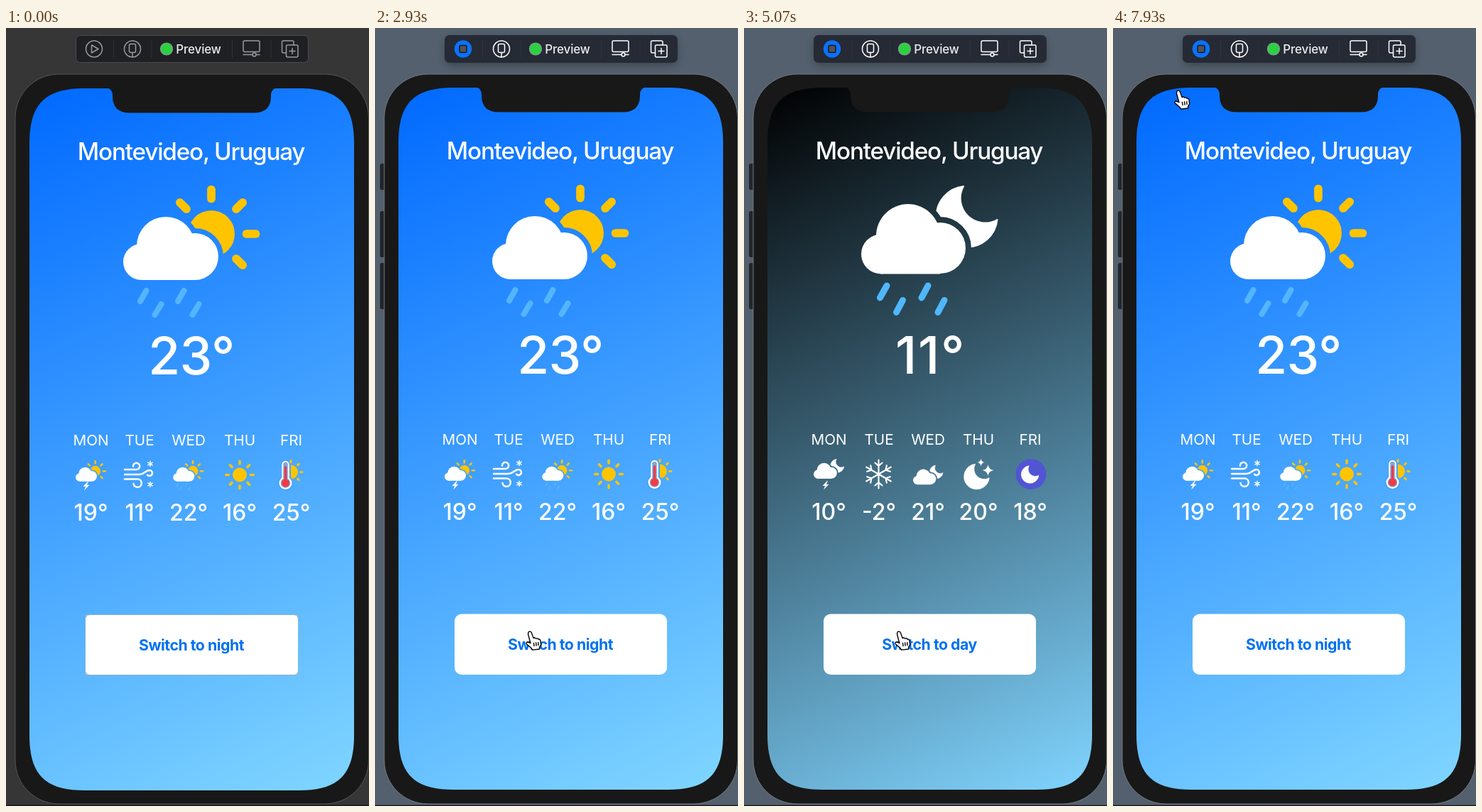
An HTML page for the animation above (8 s loop, 511 by 1096 pixels).

```html
<!DOCTYPE html>
<html lang="en">
<head>
<meta charset="utf-8">
<style>
  html, body { margin: 0; width: 511px; height: 1096px; overflow: hidden; background: #363636; }
  svg { display: block; }
  text { font-family: Inter, Roboto, sans-serif; font-optical-sizing: none; fill: #fff; text-anchor: middle; }
  .city { font-size: 33.3px; font-weight: 500; letter-spacing: -1.22px; }
  .now { font-size: 73px; font-weight: 500; letter-spacing: -.5px; }
  #night .now { letter-spacing: 1.6px; }
  .day { font-size: 20.7px; }
  .temp { font-size: 32px; font-weight: 500; }
  .label { font-size: 21.3px; font-weight: 700; letter-spacing: -.5px; fill: #0071f0; }
  .line { fill: none; stroke-linecap: round; stroke-linejoin: round; }
</style>
</head>
<body>
<svg width="511" height="1096" viewBox="0 0 511 1096">
  <defs>
    <linearGradient id="dayFill" gradientUnits="userSpaceOnUse" x1="33" y1="84" x2="490" y2="1073">
      <stop stop-color="#0069ff"/><stop offset="1" stop-color="#80d6ff"/>
    </linearGradient>
    <linearGradient id="nightFill" gradientUnits="userSpaceOnUse" x1="33" y1="84" x2="490" y2="1073">
      <stop stop-color="#000"/><stop offset="1" stop-color="#80d4ff"/>
    </linearGradient>
    <filter id="soft" x="-10%" y="-50%" width="120%" height="200%"><feGaussianBlur stdDeviation="6"/></filter>

    <g id="dayCloud">
      <circle cx="190.5" cy="328.5" r="25.5"/><circle cx="225" cy="306" r="41"/>
      <circle cx="266" cy="321" r="33"/><path d="M190 312H266V354H190z"/>
    </g>
    <g id="nightCloud">
      <circle cx="193" cy="318.5" r="28"/><circle cx="231" cy="293" r="45"/>
      <circle cx="276" cy="310" r="36"/><path d="M193 300H276V346.5H193z"/>
    </g>
    <mask id="dayGap" maskUnits="userSpaceOnUse" x="150" y="200" width="230" height="230">
      <path d="M150 200H380V430H150z" fill="#fff"/><use href="#dayCloud" stroke="#000" stroke-width="14"/>
    </mask>
    <mask id="nightGap" maskUnits="userSpaceOnUse" x="150" y="200" width="230" height="230">
      <path d="M150 200H380V430H150z" fill="#fff"/><use href="#nightCloud" stroke="#000" stroke-width="16"/>
    </mask>
    <path id="moon" d="M309 223A43 43 0 1 0 356.500 270A34.700 34.700 0 0 1 309 223z" fill="#fff" stroke="#fff" stroke-width="2" stroke-linejoin="round"/>
    <g id="cloudSun">
      <g mask="url(#dayGap)"><circle cx="289" cy="289" r="33" fill="#ffc400"/><g id="bigRays"></g></g>
      <use href="#dayCloud" fill="#fff"/>
    </g>
    <g id="cloudMoon">
      <g mask="url(#nightGap)"><use href="#moon"/></g>
      <use href="#nightCloud" fill="#fff"/>
    </g>
    <path id="dayRain" class="line" stroke="#55b5fb" stroke-width="8"
      d="M197.500 369l-8.500 15M218.500 388l-9 15M250.500 369l-8.500 15M271.500 388l-9 15"/>
    <path id="nightRain" class="line" stroke="#50b7fd" stroke-width="9"
      d="M201 363l-9.500 17M223.500 383.500l-9 17M259 363l-9 17M282 383.500l-9 17"/>
    <path id="bolt" d="M2-6L-4.500 1H-.8L-3 6.500 4.500-1.200H.8L3-6z" fill="#fff"/>
    <path id="spark" d="M0-8Q1-1 8 0Q1 1 0 8Q-1 1-8 0Q-1-1 0-8z" fill="#fff"/>
  </defs>

  <rect id="back" width="511" height="1096"/>
  <path d="M0 1095.500H511" stroke="#15101a" stroke-width="1.500"/>

  <g id="sideKeys" fill="#22262b">
    <rect x="7" y="191" width="10" height="37" rx="2.500"/>
    <rect x="7" y="258" width="10" height="65" rx="2.500"/>
    <rect x="7" y="331" width="10" height="65" rx="2.500"/>
    <rect x="508" y="258" width="6" height="107" fill="#0c0c0c"/>
  </g>
  <path id="body" fill="#181818"/>
  <path id="off" d="M33 84H490V1073H33z"/>

  <g id="app">
    <path id="screen"/>
    <path fill="#181818" d="M141 83.500Q150 84 150 94V95Q150 118.500 174 118.500H349Q373 118.500 373 95V94Q373 84 382 83.500z"/>
    <text class="city" x="260.600" y="184.500">Montevideo, Uruguay</text>
    <g id="day"></g>
    <g id="night"></g>
    <rect id="pick" x="112" y="825.500" width="299" height="85" fill="#a9c3d2" stroke="#86b4d4"/>
    <g id="button">
      <rect id="plate" x="112" width="299" fill="#fff"/>
      <text id="label" class="label" x="261" y="876"></text>
    </g>
  </g>

  <rect id="glow" x="99" y="14" width="326" height="38" rx="7" opacity=".3" filter="url(#soft)"/>
  <rect id="bar" x="98.500" y="10.500" width="327" height="38" rx="6"/>
  <path id="splits" d="M151.500 16V42M205 16V42M318.500 16V42M373 16V42"/>
  <g id="play" class="line" stroke="#9a9a9e" stroke-width="1.500">
    <circle cx="124" cy="29.500" r="11.500"/><path d="M120.500 24V35L130 29.500z"/>
  </g>
  <g id="stop">
    <circle cx="124" cy="29.500" r="12.200" fill="#0a72ff"/>
    <rect x="119" y="24.500" width="10" height="10" rx="1.500" fill="#505357" stroke="#131a26" stroke-width="1.500"/>
  </g>
  <g id="pin" class="line" stroke-width="1.500">
    <circle cx="178" cy="29.500" r="11.500"/><rect x="173.500" y="22.500" width="9" height="12" rx="2"/><path d="M178 34.500V41"/>
  </g>
  <circle cx="226" cy="29.500" r="8.500" fill="#2bd140" stroke="#8d9c90" stroke-width="1.200"/>
  <text x="271" y="35.500" style="font-size:17px;font-weight:500;letter-spacing:-.2px;fill:#ececee">Preview</text>
  <g id="tools" class="line" stroke-width="1.500">
    <rect x="334" y="18" width="23" height="15.500" rx="2"/>
    <path d="M334 37.500H347M352 37.500H357"/><circle cx="349.500" cy="37.500" r="2.500"/>
    <path d="M394 35H390.500Q388.500 35 388.500 33V20Q388.500 18 390.500 18H403Q405 18 405 20V24"/>
    <rect x="394.500" y="24" width="16.500" height="17" rx="2"/><path d="M399 32.500H407M403 28.500V36.500"/>
  </g>

  <path id="arrow" d="M0 0V20.500L4.800 16 8 24 11.800 22.400 8.500 14.800H15z" fill="#fff" stroke="#000" stroke-width="1.700"/>
  <g id="hand" stroke="#000" stroke-width="1.300" stroke-linejoin="round">
    <path fill="#fff" d="M-1-.8C.5-2.600 2.500-1.800 3.200 0L5.800 7.200C7 6.200 8.600 6.600 9.100 7.800 10.300 7 11.700 7.500 12.200 8.700 13.400 8.200 14.800 8.900 15 10.300L15.800 15.700 13.800 19.200V21.700L4.300 22.700 2.800 20.200-2.700 15.700C-4.700 13.900-3.700 11.900-1.400 12.300L1.800 13.900-1.400 1.900z"/>
    <path fill="none" d="M6 13l.8 5M9 12.600l.6 5M12 12.400l.3 4.600"/>
  </g>
</svg>

<script>
const $ = id => document.getElementById(id);
const show = (id, on) => $(id).style.display = on ? '' : 'none';
const paint = (id, attrs) => { for (const k in attrs) $(id).setAttribute(k, attrs[k]); };

// Rectangle whose corners start e away from the edges and bulge by k
function smoothRect(x, y, w, h, e, k) {
  const c = e * (1 - k), r = x + w, b = y + h;
  return `M${x + e} ${y}H${r - e}C${r - c} ${y} ${r} ${y + c} ${r} ${y + e}V${b - e}` +
    `C${r} ${b - c} ${r - c} ${b} ${r - e} ${b}H${x + e}C${x + c} ${b} ${x} ${b - c} ${x} ${b - e}V${y + e}` +
    `C${x} ${y + c} ${x + c} ${y} ${x + e} ${y}z`;
}

const line = (d, width, color = '#fff') => `<path class="line" d="${d}" stroke="${color}" stroke-width="${width}"/>`;
const spokes = (x, y, d, width, angles, color) =>
  angles.map(a => `<g transform="translate(${x} ${y}) rotate(${a})">${line(d, width, color)}</g>`).join('');
const turns = n => Array.from({ length: n }, (_, i) => i * 360 / n);
const use = (id, x = 0, y = 0, s = 1) => `<use href="#${id}" transform="translate(${x} ${y}) scale(${s})"/>`;
const text = (cls, x, y, s) => `<text class="${cls}" x="${x}" y="${y}">${s}</text>`;

const gold = '#ffc400';
const wind = line('M167 621H183.500a4.600 4.600 0 1 0-4.500-4.500M167 628H188c7 0 8-6 14-6a4 4 0 1 1-3 6.700' +
  'M167 634.500H185a5.700 5.700 0 1 1-5.500 6.500', 2.5) +
  [613, 642].map(y => spokes(203, y, 'M0-3.600V3.600', 1.5, [0, 60, 120])).join('');
const sun = `<circle cx="329" cy="628.500" r="10" fill="${gold}"/>` +
  spokes(329, 628.5, 'M0-15.500V-19.300', 3.5, turns(8), gold);
const heat = `<path d="M401 614.500a10 10 0 0 1 0 20z" fill="${gold}"/>` +
  spokes(401, 624.5, 'M0-13.700V-16', 3, [0, 45, 90, 135], gold) +
  [['#4ea3f5', 13.5, 11], ['#fff', 10.5, 9], ['#7aa6e0', 6.5, 6.8]].map(([color, width, r]) =>
    line('M393.500 614V640', width, color) + `<circle cx="393.500" cy="640" r="${r}" fill="${color}"/>`).join('') +
  line('M393.500 618V640', 3.6, '#f23b45') + '<circle cx="393.500" cy="640" r="5.500" fill="#f23b45"/>';
const flake = spokes(189.5, 628.5, 'M0 0V-20M-5-16L0-11.500 5-16', 2.1, turns(6));
const stars = use('moon', 197.6, 522, .414) + use('spark', 343.5, 623) + use('spark', 333.5, 612, .65);
const badge = '<circle cx="404" cy="628.500" r="21.500" fill="#5155d3"/>' + use('moon', 312.6, 552.7, .287);

const names = ['MON', 'TUE', 'WED', 'THU', 'FRI'];
const forecast = (xs, temps) => xs.map((x, i) =>
  text('day', x, 587, names[i]) + text('temp', x, 692.5, temps[i] + '°')).join('');

$('bigRays').innerHTML = spokes(289, 289, 'M0-49.500V-62.500', 11.7, [-45, 0, 45, 90, 135], gold);
$('day').innerHTML = use('cloudSun') + use('dayRain') + text('now', 261, 487, '23°') +
  forecast([119.5, 188, 257, 329, 401.5], [19, 11, 22, 16, 25]) +
  use('cloudSun', 61, 558.5, .224) + use('bolt', 113, 644) + wind +
  use('cloudSun', 198.3, 558.5, .224) + use('dayRain', 198.3, 558.5, .224) + sun + heat;
$('night').innerHTML = use('cloudMoon') + use('nightRain') + text('now', 262.5, 487, '11°') +
  forecast([119.5, 190, 259, 330, 403], [10, -2, 21, 20, 18]) +
  use('cloudMoon', 61, 557.3, .224) + use('bolt', 115, 644) + flake +
  use('cloudMoon', 201.7, 567, .22) + stars + badge;
paint('body', { d: smoothRect(13, 65, 497.5, 1028, 62, .56) });
paint('screen', { d: smoothRect(33, 84, 457, 989, 78, .72) });

const LOOP = 8000, RUN = 1800, LAUNCH = 2870, HOLD = 270, FADE = 350;
const presses = [3870, 6530];
// start, end, from x, y, to x, y
const moves = [
  [1370, 1640, 112, -26, 121, 24],
  [2150, 2840, 130, 24, 217, 852],
  [7400, 7930, 217, 852, 91, 90]
];

function pointer(t) {
  let at = [112, -40];
  for (const [start, end, x0, y0, x1, y1] of moves) {
    if (t < start) break;
    const u = Math.min(1, (t - start) / (end - start)), e = u * u * (3 - 2 * u);
    at = [x0 + (x1 - x0) * e, y0 + (y1 - y0) * e];
  }
  return at;
}

function buttonAlpha(t) {
  const press = presses.find(p => t >= p && t < p + HOLD + FADE);
  if (press === undefined) return 1;
  return .2 + .8 * Math.max(0, (t - press - HOLD) / FADE);
}

function draw(t) {
  const running = t >= RUN, live = t >= LAUNCH;
  const night = t >= presses[0] + HOLD && t < presses[1] + HOLD;

  paint('back', { fill: running ? '#54606e' : '#363636' });
  paint('body', { stroke: running ? '#747b83' : '#555' });
  paint('bar', { fill: running ? '#252a35' : '#1f2024', stroke: running ? '#272c37' : '#4b4b4f' });
  paint('splits', { stroke: running ? '#2d3442' : '#303136' });
  paint('pin', { stroke: running ? '#fff' : '#9a9a9e' });
  paint('tools', { stroke: live ? '#fff' : running ? '#6b7079' : '#9a9a9e' });
  for (const id of ['sideKeys', 'glow', 'stop']) show(id, running);
  show('play', !running);
  show('pick', !running);
  show('off', running && !live);
  show('app', !running || live);

  paint('app', { transform: `translate(0 ${running ? 0 : 1})` });
  paint('screen', { fill: `url(#${night ? 'nightFill' : 'dayFill'})` });
  show('day', !night);
  show('night', night);
  paint('plate', running ? { y: 825.5, height: 85.5, rx: 10 } : { y: 826, height: 84, rx: 6 });
  paint('button', { opacity: buttonAlpha(t) });
  $('label').textContent = night ? 'Switch to day' : 'Switch to night';

  const [x, y] = pointer(t), onPhone = y > 64;
  show('arrow', !onPhone);
  show('hand', onPhone);
  paint(onPhone ? 'hand' : 'arrow', { transform: `translate(${x} ${y})` + (onPhone ? ' scale(1.06)' : '') });
}

const begin = performance.now();
function tick() {
  draw((performance.now() - begin) % LOOP);
  requestAnimationFrame(tick);
}
tick();
</script>
</body>
</html>
```
